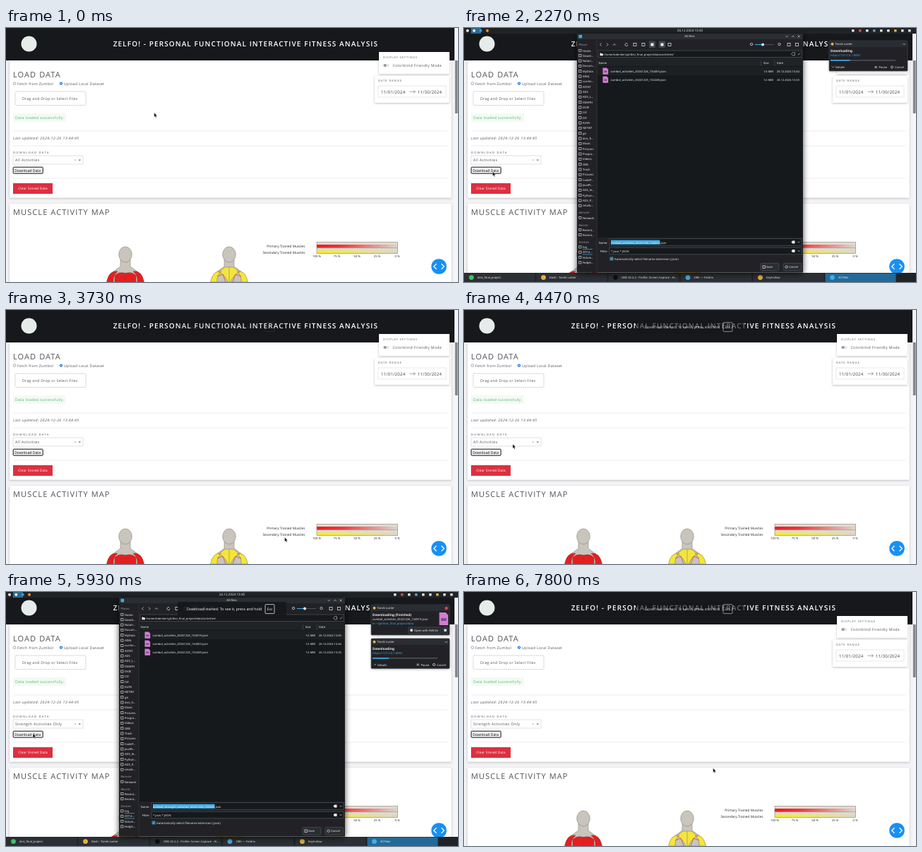
Recreate the animation shown at these times as an HTML page. Size 640 px wide and 360 px high, loop 7.87 s.

```html
<!DOCTYPE html>
<html lang="en">
<head>
<meta charset="utf-8">
<title>Fitness dashboard download</title>
<style>
html, body { margin: 0; width: 100%; height: 100%; overflow: hidden; background: #f3f3f6; }
svg { display: block; width: 640px; height: 360px; }
text { white-space: pre; text-rendering: geometricPrecision; font-family: "Open Sans", sans-serif; }
.ui { font-family: "Noto Sans", sans-serif; }
.b { font-weight: 600; }
.m { font-weight: 500; }
.i { font-style: italic; }
.mid { text-anchor: middle; }
.end { text-anchor: end; }
</style>
</head>
<body>
<svg id="stage" viewBox="0 0 640 360" xmlns="http://www.w3.org/2000/svg"></svg>
<script>
const LOOP = 7870;
const INK = '#505258', PALE = '#eceef0', DIM = '#9a9ea3', BLUE = '#3daee9', LINE = '#e6e6ee';
const VIEW = '#16191c', WINDOW = '#202326', BAR = '#2a2d31', EDGE = '#4b5056';

const text = (x, y, s, size, fill = INK, cls = '', ls = 0) =>
  `<text x="${x}" y="${y}" font-size="${size}" fill="${fill}" class="${cls}" letter-spacing="${ls}">${s}</text>`;
const ui = (x, y, s, fill = PALE, cls = '', size = 4.1) => text(x, y, s, size, fill, 'ui ' + cls);
const rect = (x, y, w, h, fill, extra = '') =>
  `<rect x="${x}" y="${y}" width="${w}" height="${h}" fill="${fill}" ${extra}/>`;
const dot = (x, y, r, fill, extra = '') => `<circle cx="${x}" cy="${y}" r="${r}" fill="${fill}" ${extra}/>`;
const path = (d, stroke, w = .6, fill = 'none') =>
  `<path d="${d}" stroke="${stroke}" stroke-width="${w}" fill="${fill}"/>`;
const group = (id, body, extra = '') => `<g id="${id}" ${extra}>${body}</g>`;
const box = c => `stroke="${c}" stroke-width=".7"`;

const defs = `<defs>
  <filter id="soft" x="-10%" y="-10%" width="120%" height="125%">
    <feDropShadow dx="0" dy="1" stdDeviation="1.6" flood-color="#000" flood-opacity=".25"/></filter>
  <filter id="deep" x="-10%" y="-10%" width="120%" height="120%">
    <feDropShadow dx="0" dy="2" stdDeviation="4" flood-color="#000" flood-opacity=".7"/></filter>
  <linearGradient id="red"><stop stop-color="#f01a20"/><stop offset=".3" stop-color="#f0343a"/><stop offset="1" stop-color="#ddd6cc"/></linearGradient>
  <linearGradient id="yel"><stop stop-color="#f8ec20"/><stop offset=".3" stop-color="#f4ea48"/><stop offset="1" stop-color="#ddd6cc"/></linearGradient>
</defs>`;

function header() {
  return rect(0, 0, 635, 46, '#17181b') + dot(32.5, 22.5, 11, '#e6ecea') +
    text(527, 25.8, 'ZELFO! - PERSONAL FUNCTIONAL INTERACTIVE FITNESS ANALYSIS', 10, '#fff', 'b end', 1.1);
}

function loadCard() {
  const rules = [146, 167, 213].map(y => path(`M10 ${y}H625`, LINE, .7)).join('');
  return rect(5, 46, 625.5, 194.5, '#fff', 'filter="url(#soft)"') +
    text(10, 69.6, 'LOAD DATA', 11, INK, 'm', 1.1) +
    dot(12, 78.6, 1.9, '#fff', box('#8a8a92')) + text(16, 80.7, 'Fetch from Zumbol', 5.2, INK, '', .3) +
    dot(78, 78.6, 2.2, '#1f7bea') + dot(78, 78.6, .8, '#fff') + text(82, 80.7, 'Upload Local Dataset', 5.2, INK, '', .3) +
    rect(13, 90, 100, 19.5, 'none', 'rx="1.5" stroke="#b4b4bc" stroke-width=".7" stroke-dasharray="2 1"') +
    text(23, 101.7, 'Drag and Drop or Select Files', 5.2, INK, '', .3) +
    rect(10, 121, 75, 12, '#f3faf4') + text(13, 129, 'Data loaded successfully.', 5.2, '#52b36c', '', .35) +
    text(10, 158, 'Last updated: 2024-12-26 13:44:45', 5.2, INK, 'i', .42) + rules +
    text(10, 177.5, 'DOWNLOAD DATA', 4.2, INK, '', 1.25) +
    rect(10, 181, 99, 12, '#fff', box('#d3d3da')) +
    `<text id="choice" x="13" y="189.1" font-size="5.4" fill="${INK}" letter-spacing=".35"></text>` +
    text(98, 189, '×', 5, '#88888e', 'mid') + path('M102.6 186.4h3.4l-1.7 2z', 'none', 0, '#707076') +
    rect(10.2, 197.2, 42, 9, '#f0f0f2', 'rx="1" stroke="#151518" stroke-width="1"') +
    ui(12.2, 203.6, 'Download Data', '#111', '', 5.1) +
    rect(10, 220, 56, 15, '#dc3040') + text(38, 229.3, 'Clear Stored Data', 4.8, '#fff', 'mid', .14);
}

const head = `<g fill="#c9c5bc" stroke="#85837e" stroke-width=".6">
  <path d="M-7 328V338L-18 346V360H18V346L7 338V328z"/><ellipse cy="321" rx="9.3" ry="11"/></g>`;

function muscleCard() {
  const arm = 'M-11 345Q-23 343-26.5 360H-17Q-18 351-11 345z M11 345Q23 343 26.5 360H17Q18 351 11 345z';
  const ticks = [100, 75, 50, 25, 0].map((v, i) =>
    text(440 + i * 28.5, 325, v + ' %', 4.3, '#222', 'mid')).join('');
  return rect(5, 249, 625.5, 120, '#fff', 'filter="url(#soft)"') +
    text(10, 264.6, 'MUSCLE ACTIVITY MAP', 11, INK, 'm', 1.1) +
    `<g transform="translate(169)">${head}` +
    path(arm + 'M-15 351Q-10 345 0 347.5Q10 345 15 351V360H-15z', '#80443e', .6, '#e61e20') +
    path('M0 347.5V360', '#80443e') + '</g>' +
    `<g transform="translate(316)">${head}` +
    path(arm + 'M-6 339L-15 346Q-7 348-2 360H2Q7 348 15 346L6 339z', '#a07a3a', .6, '#f3e63a') +
    path('M-17 352L-9 349L-5 360 M17 352L9 349L5 360', '#cf3a30', .7) + path('M0 339V360', '#85837e') + '</g>' +
    text(423.5, 310.6, 'Primary Trained Muscles', 4.75, '#222', 'end') +
    text(423.5, 320, 'Secondary Trained Muscles', 4.75, '#222', 'end') +
    rect(440, 303.5, 114.5, 16, '#e0dad0') + rect(440, 307, 114.5, 4.6, 'url(#red)') +
    rect(440, 315.4, 114.5, 4.1, 'url(#yel)') +
    rect(440, 303.5, 114.5, 16, 'none', 'stroke="#85827c" stroke-width=".6"') +
    path('M440 311.7H554.5', '#85827c', .5) + ticks;
}

function settings() {
  return rect(528, 34, 100, 31, '#fff', 'filter="url(#soft)"') +
    text(534, 42.6, 'DISPLAY SETTINGS', 4, INK, '', .9) +
    rect(534, 51, 8.5, 4, '#e2e2e8', 'rx="2"') + dot(536.6, 53, 2, '#96969c') +
    text(547.5, 55, 'Colorblind Friendly Mode', 5.2, INK, '', .35) +
    rect(522, 68, 106, 38, '#fff', 'filter="url(#soft)"') +
    text(527, 76, 'DATE RANGE', 4, INK, '', 1) +
    rect(527, 82, 96, 16, '#fff', box('#dedee4')) +
    text(531, 92.6, '11/01/2024', 6.1, '#3c3e43', '', .2) + text(582.8, 92.6, '11/30/2024', 6.1, '#3c3e43', '', .2) +
    path('M571.5 90.3h8m-2.4-2.2l2.4 2.2l-2.4 2.2', '#66686e') +
    rect(635, 0, 5, 360, '#f6f6f9') + rect(635.8, 46, 3.8, 75, '#86868c') +
    dot(613, 338, 10.8, '#1890f5') +
    path('M609.5 334.2l-3.8 3.8l3.8 3.8M616.5 334.2l3.8 3.8l-3.8 3.8', '#fff', 1.3);
}

function menu() {
  return rect(10, 193, 99, 25, '#fff', box('#cdcdd4')) + rect(10.4, 205.5, 98.2, 12, '#eef4fb') +
    text(13, 201, 'All Activities', 5.4, INK, '', .35) + text(13, 213.4, 'Strength Activities Only', 5.4, INK, '', .35);
}

const places = ['Home', 'Downl…', 'Notari…', 'Docum…', 'MyData', 'AIML', 'curren…', 'ASTAT', 'ADS', 'ADS_L…', 'DMATH',
  'DVIZ', 'I2C', 'ISF', 'KUFA', 'NETW1', 'git', 'dviz_fi…', 'Music', 'Pictures', 'Progra…', 'Videos', 'OBS', 'Trash',
  'Pictures', 'CodeP…', 'JavaPr…', 'ADS_le…', 'Python…', 'ADS_P…', 'retails…'];

function sidebar() {
  const item = (y, s) => rect(162.8, y - 3.2, 3.2, 3.2, 'none', `stroke="${PALE}" stroke-width=".6"`) + ui(168, y, s);
  const list = (y, names) => names.map((s, i) => item(y + i * 7.33, s)).join('');
  const title = (y, s) => ui(162.5, y, s, DIM);
  return title(25, 'Places') + list(33.5, places) + title(262.5, 'Remote') + list(270.5, ['Network']) +
    title(280.5, 'Recent') + list(287.5, ['Recent…', 'Recent…']) +
    title(304.5, 'Devices') + list(312, ['hiq', '297.4…', 'Volum…', 'Fedph…']) +
    path('M168 313.5h14M168 321h14', BLUE, .7);
}

function fileRow(y, stamp, time) {
  return path(`M196.5 ${y - 4.5}h5.5l2.2 2.2v7h-7.7z`, 'none', 0, '#cf7fd0') + rect(198.3, y - .5, 4, 2.4, '#8d4696') +
    ui(207.5, y + 1.6, `zumbol_activities_${stamp}.json`) + ui(424, y + 1.6, '1.6 MiB', PALE, '', 4) +
    ui(443, y + 1.6, `26.12.2024 ${time}`, PALE, '', 4);
}

function dialog() {
  const tools = [242, 254, 291, 460, 471.5].map(x => rect(x - 2, 21.5, 4, 4, 'none', box(PALE))).join('');
  const active = [266.5, 280.5].map(x => rect(x - 4.5, 18.5, 9, 9.5, '#41474d', 'rx="1"') +
    rect(x - 2, 21.5, 4, 4, PALE)).join('');
  const field = y => rect(206, y, 272, 9.6, VIEW, box(EDGE)) + path(`M472.5 ${y + 4}l1.6 1.6l1.6-1.6`, PALE) +
    path(`M463.5 ${y + 4.8}l1.6-2h3.4v4h-3.4z`, 'none', 0, PALE);
  const button = (x, s, id) => rect(x, 333.5, 26, 10.5, BAR, `id="${id}" rx="1.2" stroke="${EDGE}" stroke-width=".7"`) +
    ui(x + 8, 340.3, s);
  return rect(160, 8, 320, 338.5, WINDOW, 'filter="url(#deep)"') + rect(160, 8, 320, 8, BAR) +
    ui(319.5, 13.3, 'All Files', PALE, 'mid') + rect(162.5, 9.7, 4.6, 4.6, BLUE) +
    path('M455.5 11l1.7 1.7l1.7-1.7M464.3 12.7l1.7-1.7l1.7 1.7M472.5 10.4l3 3m0-3l-3 3', PALE) +
    sidebar() + path('M188 17V346', '#383c40') +
    path('M194.5 21.5l-2 2l2 2M202 21.5l2 2l-2 2M211 24.5l2-2l2 2M231.5 22.2a2 2 0 1 0 .5 1.6', PALE, .7) +
    tools + active + dot(407, 23, 1.7, 'none', box(PALE)) + dot(446.5, 23, 1.7, 'none', box(PALE)) +
    path('M412 23.5h27', EDGE, 1) + path('M412 23.5h10', BLUE, 1) + dot(423, 23.5, 2, PALE) +
    rect(190, 32, 288, 9.5, VIEW, box(EDGE)) + path('M192.5 35.5h1.6l.6.8h2.2v3h-4.4z', 'none', 0, PALE) +
    path('M463.5 36.8l1.6-2h3.4v4h-3.4zM472.5 36.8l1.2 1.4l2.2-3', PALE, .5) +
    ui(198, 38.6, '/home/tobinker/git/dviz_final_project/data/activities/', PALE, '', 4) +
    rect(189, 45, 290, 252, VIEW) + rect(189, 45, 290, 9, WINDOW) +
    ui(190.5, 51.4, 'Name') + ui(424, 51.4, 'Size') + ui(443, 51.4, 'Date') + path('M420.5 46v8M440 46v8', EDGE) +
    rect(189, 55, 290, 12, '#1d2023') +
    group('filesA', fileRow(61, '20241226_134453', '13:44') + fileRow(73, '20241225_132248', '13:33')) +
    group('filesB', fileRow(61, '20241226_134519', '13:45') + fileRow(73, '20241226_134453', '13:44') +
      fileRow(85, '20241225_132249', '13:33')) +
    ui(203.5, 305.5, 'Name:', PALE, 'end') + field(298.7) +
    rect(208, 300.6, 0, 6.2, BLUE, 'id="pick"') +
    `<text class="ui" x="208" y="305.5" font-size="4.1" fill="${PALE}"><tspan id="name"></tspan>.json</text>` +
    ui(203.5, 318, 'Filter:', PALE, 'end') + field(311.2) + ui(208, 318, '*.json,*.JSON') +
    rect(207, 325, 4, 4, '#24587a', box(BLUE)) + path('M207.9 327l.9 1l1.5-2', '#fff') +
    ui(213, 328.7, 'Automatically select filename extension (.json)', PALE, '', 4.2) +
    button(420, 'Save', 'save') + rect(423, 337, 3.5, 3.5, 'none', box(PALE)) +
    button(452, 'Cancel', 'cancel') + dot(456.6, 338.7, 1.7, 'none', box(PALE));
}

function panels() {
  const tray = ['#e0e2e4', '#d8503c', '#e0e2e4', '#5aa0d0', '#e0e2e4', '#e0e2e4', '#e0b040', '#e0e2e4', '#e0e2e4']
    .map((c, i) => rect(549 + i * 10, 2, 3.6, 3.6, c, 'rx=".8"')).join('');
  const apps = dot(5, 3.8, 2, PALE) + rect(10, 0, 14, 8, '#2a6a90') + dot(14.3, 3.8, 2, PALE) +
    dot(23.6, 3.8, 2, '#4c9bd0') + dot(33, 3.8, 2, '#e09a3a');
  const task = (x, s, c, shade = '#2c3034') => rect(x - 5, 347.6, 100, 12.4, shade) +
    dot(x + 5, 353.6, 3.4, c) + ui(x + 13.5, 355.1, s);
  return rect(0, 0, 640, 8, WINDOW) + apps + tray + ui(320, 5.4, '26.12.2024 13:45', PALE, 'mid', 4.6) +
    rect(0, 347, 640, 13, WINDOW) + task(5.5, 'dviz_final_project', '#3fc06a') +
    task(107.5, 'Dash - Tarvik Luster', '#e2b43c') + task(209.5, 'OBS 30.2.2 - Profile: Screen Capture - Al…', '#0e0f10') +
    task(312, 'OBS — Foldrix', '#4aa8dc') + task(414.5, 'Keyhollow', '#e2b43c') + task(516.5, 'All Files', BLUE, '#236a98');
}

const noteFrame = (y, h) => rect(517, y, 111, h, WINDOW, `rx="1.5" filter="url(#soft)" stroke="${EDGE}" stroke-width=".6"`) +
  rect(517.3, y + .3, 110.4, 8.6, BAR) + dot(521.5, y + 4.7, 2, '#e2b43c') + ui(525.5, y + 6.4, 'Tarvik Luster');
const chevron = y => path(`M621.4 ${y + 4}l1.8 1.8l1.8-1.8`, PALE);

function running(y, h, id) {
  return noteFrame(y, h) + chevron(y) + ui(519, y + 16, 'Downloading', PALE, 'b', 4.7) +
    ui(519, y + 22, 'https://127.0.0.1:8050', BLUE) +
    rect(519, y + 27, 92, 1.6, EDGE) + rect(519, y + 27, 0, 1.6, BLUE, `id="${id}"`) +
    `<text id="${id}Pct" class="ui end" x="626" y="${y + 29}" font-size="3.8" fill="${PALE}"></text>` +
    path(`M521 ${y + h - 6.5}l1.5 1.5l1.5-1.5`, PALE) + ui(526, y + h - 4, 'Details') +
    path(`M582.3 ${y + h - 7}v3m1.8-3v3`, PALE, .8) + ui(587.5, y + h - 4, 'Pause') +
    dot(606, y + h - 5.5, 1.6, 'none', box(PALE)) + ui(610, y + h - 4, 'Cancel');
}

function finished() {
  return noteFrame(18, 43) + dot(623.5, 23, 2.2, '#da4453') + ui(519, 34, 'Downloading (Finished)', PALE, 'b', 4.7) +
    ui(519, 40.3, 'zumbol_activities_20241226_134519.json') + ui(519, 46.3, 'in ~/git/dviz_final_project/data', BLUE) +
    path('M613.5 29h9l3.5 3.5v14.5h-12.5z', 'none', 0, '#cf7fd0') + rect(616, 37, 7.5, 4, '#8d4696') +
    rect(570, 49.8, 46, 9, BAR, `rx="1" stroke="${EDGE}" stroke-width=".6"`) +
    rect(572.5, 52.5, 3.2, 3.4, PALE) + ui(578, 55.8, 'Open with KWrite') +
    rect(618, 49.8, 8, 9, BAR, `rx="1" stroke="${EDGE}" stroke-width=".6"`) + rect(620.3, 52.5, 3.4, 3.4, PALE);
}

function banner() {
  return rect(243, 14, 154, 20, '#17181b', 'rx="2" opacity=".9"') +
    text(256, 26, 'Download started. To see it, press and hold', 5.3, '#fff') +
    rect(367, 17.6, 13, 13, 'none', 'rx="1.2" stroke="#fff" stroke-width=".7"') + text(373.5, 26, 'Esc', 5, '#fff', 'mid');
}

const $ = id => document.getElementById(id);
$('stage').innerHTML = defs + rect(0, 0, 640, 360, '#f3f3f6') + loadCard() + muscleCard() + header() + settings() +
  group('menu', menu()) +
  group('desktop', panels() + dialog() + group('noteA', running(18, 43, 'barA')) +
    group('noteB', finished() + running(66, 42.5, 'barB'))) +
  group('banner', banner()) +
  group('cursor', path('M0 0V6.2L1.4 5L2.4 7.2L3.5 6.7L2.5 4.6H4.4z', '#fff', .4, '#0c0c0c'));

// time, x, y of the pointer tip
const route = [[0, 209.7, 120], [470, 209.7, 120], [1700, 40.5, 203.5], [2600, 40.5, 203.5], [3400, 427.5, 335.5],
  [3600, 427.5, 335.5], [4300, 69, 190], [4620, 69, 190], [4900, 56, 210], [5020, 56, 210], [5450, 38, 200.5],
  [6200, 38, 200.5], [7150, 428, 335.5], [7420, 428, 335.5], [7770, 352.6, 249.6], [LOOP, 352.6, 249.6]];

const clamp = v => Math.min(1, Math.max(0, v));
const ramp = (t, a, b) => clamp((t - a) / (b - a));
const show = (id, on) => $(id).setAttribute('display', on ? 'inline' : 'none');

function pointer(t) {
  const i = Math.max(1, route.findIndex(p => p[0] > t));
  const [a, x, y] = route[i - 1], [b, u, v] = route[i];
  const k = ramp(t, a, b), e = k * k * (3 - 2 * k);
  return [x + (u - x) * e, y + (v - y) * e];
}

function progress(id, k) {
  $(id).setAttribute('width', 92 * k);
  $(id + 'Pct').textContent = k < 1 ? '' : '100%';
}

function draw(t) {
  const first = t >= 2130 && t < 3670, second = t >= 5870 && t < 7470;
  show('desktop', first || second);
  show('filesA', first); show('noteA', first);
  show('filesB', second); show('noteB', second);
  show('menu', t >= 4620 && t < 5020);
  $('choice').textContent = t >= 5020 ? 'Strength Activities Only' : 'All Activities';

  if (first || second) {
    $('name').textContent = first ? 'zumbol_activities_20241226_134519' : 'zumbol_strength_activities_20241226_134532';
    const picked = first ? t < 3470 : t < 7270;
    $('pick').setAttribute('width', picked ? $('name').getComputedTextLength() : 0);
    const hover = first ? t > 3350 : t > 7100;
    $('save').setAttribute('stroke', hover ? BLUE : EDGE);
    $('save').setAttribute('fill', hover ? '#2b4a5e' : BAR);
    progress('barA', .25 + .75 * ramp(t, 2200, 3300));
    progress('barB', .25 + .75 * ramp(t, 5930, 7000));
  }

  const lit = t < 5870 ? .7 * ramp(t, 3700, 3900) : t < 7470 ? 1 - ramp(t, 6300, 6500) : .7 * ramp(t, 7470, 7670);
  $('banner').setAttribute('opacity', lit);
  $('cursor').setAttribute('transform', `translate(${pointer(t).join(' ')})`);
}

const start = performance.now();
function tick() {
  draw((performance.now() - start) % LOOP);
  requestAnimationFrame(tick);
}
tick();
</script>
</body>
</html>
```
